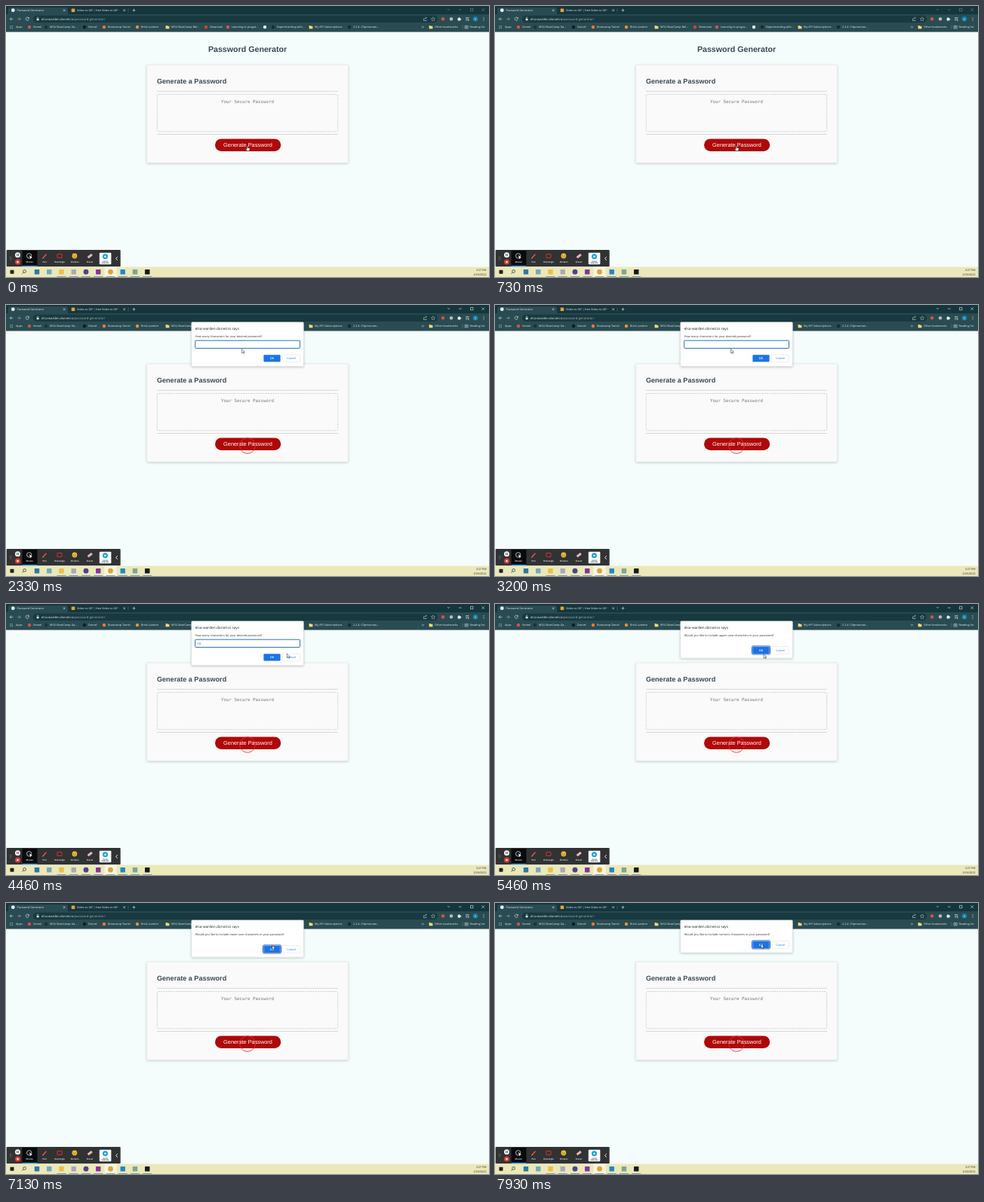
An HTML page for the animation above (8 s loop, 640x360 px).

```html
<!DOCTYPE html>
<html lang="en">
<head>
<meta charset="utf-8">
<title>Password Generator</title>
<style>
html, body { margin: 0; width: 100%; height: 100%; overflow: hidden; background: #f4fcfc; }
svg { display: block; width: 640px; height: 360px; }
text { font-family: "Open Sans", "Noto Sans", sans-serif; text-rendering: geometricPrecision; white-space: pre; }
.arial { font-family: "Liberation Sans", Arial, sans-serif; }
.mono { font-family: "DejaVu Sans Mono", monospace; }
.b { font-weight: bold; }
.semi { font-weight: 600; }
</style>
</head>
<body>
<svg id="stage" viewBox="0 0 640 360">
  <defs>
    <filter id="shade" x="-10%" y="-20%" width="120%" height="150%">
      <feDropShadow dx="0" dy=".8" stdDeviation="1.5" flood-opacity=".25"/>
    </filter>
  </defs>
</svg>
<script>
const stage = document.getElementById('stage');
const rect = (x, y, w, h, fill, r = 0, more = '') =>
  `<rect x="${x}" y="${y}" width="${w}" height="${h}" fill="${fill}" rx="${r}" ${more}/>`;
const dot = (x, y, r, fill, more = '') => `<circle cx="${x}" cy="${y}" r="${r}" fill="${fill}" ${more}/>`;
const line = (d, color, w = .6, more = '') => `<path d="${d}" fill="none" stroke="${color}" stroke-width="${w}" ${more}/>`;
const text = (x, y, size, fill, s, anchor = 'start', cls = '') =>
  `<text x="${x}" y="${y}" font-size="${size}" fill="${fill}" text-anchor="${anchor}" class="${cls}">${s}</text>`;
const folder = (x, y) => `<path d="M${x - 2.4} ${y - 2}h2l.7.8h2.1v3.4h-4.8z" fill="#f8d775"/>`;
const square = (x, y, s, fill) => rect(x - s / 2, y - s / 2, s, s, fill, .4);

const STRIP = '#15363d', BAR = '#294b52', FIELD = '#18393f', PALE = '#e3ecee', SOFT = '#9fb2b6';
const INK = '#3b4954', BLUE = '#1a73e8';

function browser() {
  let s = rect(0, 0, 640, 12, STRIP) + rect(0, 11, 640, 23.5, BAR);
  s += `<path d="M1 11.5q2 0 2-2v-5q0-2.500 2.500-2.500h74q2.500 0 2.500 2.500v5q0 2 2 2z" fill="${BAR}"/>`;
  s += dot(9.3, 5.7, 2.4, '#e8eef0') + text(14.5, 7.1, 3.75, PALE, 'Password Generator');
  s += line('M75.800 4.300l2.800 2.800m0-2.800l-2.800 2.800', PALE);
  s += square(89, 5.7, 4.6, '#e0a33a') + text(94, 7.1, 3.75, PALE, 'Video to GIF | free Video to GIF ·');
  s += line('M155.300 4.300l2.800 2.800m0-2.800l-2.800 2.800', PALE);
  s += line('M162 3.500v5', SOFT, .3) + line('M167.500 5.700h4m-2-2v4', PALE);
  s += `<g id="controls">${line('M585 4l1.500 1.500 1.500-1.500M600 5h3.600M615.500 3.300h3.400v3.400h-3.400zM630.500 3.300l3.500 3.500m0-3.500l-3.500 3.500', PALE)}</g>`;

  s += line('M9.500 17.300h-4.300m2-2l-2 2 2 2', PALE) + line('M15 17.300h4.300m-2-2l2 2-2 2', SOFT);
  s += line('M30 15.900a2.100 2.100 0 1 0 .3 1.800M30.400 14.900v1.700h-1.700', PALE);
  s += rect(36, 12.7, 536, 9.2, FIELD, 4.6);
  s += rect(40.700, 16.700, 2.8, 2.5, PALE, .3) + line('M41.200 16.700v-1a.9.9 0 0 1 1.800 0v1', PALE, .5);
  s += `<text x="47" y="18.800" font-size="4.2" fill="${PALE}">elsa-warden.dorvel.io<tspan fill="${SOFT}">/password-generator/</tspan></text>`;
  s += line('M553.500 16.500v3h3.500v-1.200M554.500 17.600q.3-2 2.700-2m-1-1l1 1-1 1', PALE, .5);
  s += line('M566 14.700l.8 1.700 1.800.2-1.300 1.300.3 1.800-1.600-.9-1.600.9.3-1.800-1.300-1.300 1.800-.2z', PALE, .4);
  s += dot(579, 17.300, 2.200, '#df4d40') + dot(590, 17.300, 2.200, '#b4bdbf');
  s += rect(598.600, 16, 3.700, 3.400, PALE, .3) + dot(600.300, 15.700, .8, PALE) + dot(602.600, 17.500, .8, PALE);
  s += line('M609 15.500h4.500m-4.500 1.700h4.500m-4.500 1.700h2.300', PALE) + dot(612.700, 19, .8, PALE);
  s += dot(622, 17.300, 3.300, '#1685ad') + text(622, 18.700, 3.700, '#fff', 'E', 'middle');
  s += [15.500, 17.300, 19.100].map(y => dot(633, y, .5, PALE)).join('');

  for (let i = 0; i < 9; i++) s += square(5.500 + i % 3 * 1.6, 26.400 + (i / 3 | 0) * 1.6, 1, i % 2 ? '#e9b44a' : '#73b9c3');
  // icon x, icon colour (none for a folder), label
  const marks = [
    [31, '#d95045', 'Vomel'], [53, '#272f31', 'MSU BootCamp Ga...'], [104, '#121a1c', 'Dorvel'],
    [130, '#e77837', 'Bootcamp Tarnel'], [174, '#df9341', 'Brick Lantern'], [214, '', 'MSU BootCamp Bel...'],
    [265, '#e53a32', 'Viewnook'], [294, '#e5504a', 'Learning to progra...'], [343, '#f2f4f4', ''],
    [354, '#192a2e', 'Experimenting with...'], [404, '', 'My API Subscriptions'],
    [455, '#192a2e', '2.2.4- Clipmorrow...'], [563, '', 'Other bookmarks']
  ];
  s += text(13, 29.400, 3.75, PALE, 'Apps');
  for (const [x, color, label] of marks)
    s += (color ? dot(x, 28, 2.2, color) : folder(x, 28)) + text(x + 5, 29.400, 3.75, PALE, label);
  s += line('M551 26.800l1.200 1.200-1.200 1.200m1.600-2.400l1.200 1.200-1.200 1.200', PALE, .5);
  s += line('M605 25.500v5', SOFT, .3) + line('M608 26.300h4.200v3.600h-4.200zm1 1.200h2.200m-2.200 1.200h2.200', PALE, .5);
  return s + text(614.500, 29.400, 3.75, PALE, 'Reading list');
}

function page() {
  const rule = y => line(`M200 ${y}h240`, '#c8cbce', .7);
  return rect(0, 34, 640, 313, '#f4fcfc')
    + text(320, 61.1, 10.67, INK, 'Password Generator', 'middle', 'arial b')
    + rect(186.700, 78.200, 266.600, 130, '#fafafa', 1, 'stroke="#dfe3e4" stroke-width=".4" filter="url(#shade)"')
    + text(200, 103, 9.07, INK, 'Generate a Password', 'start', 'arial b')
    + rule(113.300) + rule(170.500)
    + rect(200.300, 117.500, 239.400, 49.300, 'none', 1.500, 'stroke="#bcc0c2" stroke-width=".75" stroke-dasharray="2 1.3"')
    + text(320, 129, 5.82, '#777', 'Your Secure Password', 'middle', 'mono')
    + rect(277, 176.400, 87.200, 16.600, '#af0808', 8.300)
    + text(320.500, 187.200, 7.34, '#fff', 'Generate Password', 'middle', 'arial');
}

function recorder() {
  const label = (x, s) => text(x, 341.100, 2.9, '#eee', s, 'middle', 'semi');
  let s = rect(.7, 324, 151, 22.300, '#303234', 1) + rect(21.500, 325, 20, 21, '#090a0b') + rect(21.500, 344.800, 20, 1.4, '#2793df');
  for (let i = 0; i < 6; i++) s += dot(5.300 + i % 2 * 1.7, 333.500 + (i / 2 | 0) * 1.8, .45, '#aaa');
  s += dot(15.500, 330.700, 3.500, '#f5f5f5') + line('M14.700 329.200v3m1.700-3v3', '#333', .8);
  s += dot(15.500, 340.100, 3.500, '#e33b32') + square(15.500, 340.100, 2.2, '#fff');
  s += dot(30.700, 331.900, 3.200, 'none', 'stroke="#ddd" stroke-width=".8"') + `<path d="M31 331l3.800 3.600-1.700.2-.8 1.600z" fill="#fff"/>`;
  s += line('M49 334.700l4.500-5', '#ef493f', 1.700) + line('M48.400 335.500l1-1', '#fff', .8);
  s += rect(68, 329.500, 6, 5, 'none', .3, 'stroke="#dc3028" stroke-width="1"');
  s += dot(90.900, 332, 3.400, '#f2bd35') + dot(89.700, 331.200, .45, '#543') + dot(92.100, 331.200, .45, '#543') + line('M89.200 332.800q1.700 1.900 3.400 0', '#543', .5);
  s += rect(107.700, 330.700, 6.800, 3.100, '#eab3b3', .6, 'transform="rotate(-38 111 332)"');
  s += label(31.200, 'Mouse') + label(51.200, 'Pen') + label(71.200, 'Rectangle') + label(91.200, 'Stickers') + label(111.200, 'Eraser');
  s += rect(123.800, 327.700, 15.600, 15.500, '#fbfdfe', 1) + dot(131.500, 332.800, 3.500, '#22a0d3') + square(131.500, 332.800, 2.3, '#fff');
  s += text(131.500, 339.500, 2.1, '#345', 'SHOW', 'middle', 'b') + text(131.500, 342, 2.1, '#345', 'WEBCAM', 'middle', 'b');
  return s + line('M147.700 333.200l-2 2.300 2 2.300', '#fff', .9);
}

function taskbar() {
  let s = rect(0, 346.600, 640, 13.400, '#ebe8b9') + rect(130.500, 346.600, 16, 13.400, '#f8f6df');
  s += square(8, 353.200, 5, '#222') + dot(24.600, 352.400, 1.900, 'none', 'stroke="#222" stroke-width=".7"') + line('M23.200 353.800l-1.700 1.800', '#222', .7);
  const apps = ['#2d78a5', '#75a9bd', '#edbd48', '#a8a9ba', '#4b438d', '#80379a', '#dca43d', '#2486c8', '#7ca795', '#171a1c'];
  apps.forEach((color, i) => {
    const x = 41 + i * 16.25;
    s += i === 4 || i === 6 ? dot(x, 353.200, 3.400, color) : square(x, 353.200, 6.4, color);
    if (i > 1) s += rect(x - 6, 359.300, 12, .7, '#5b7d91');
  });
  return s + text(636.500, 351.900, 3.6, '#222', '3:27 PM', 'end') + text(636.500, 358.100, 3.6, '#222', '2/26/2022', 'end');
}

const questions = [
  [1530, 'How many characters for your desired password?', 81.500],
  [4930, 'Would you like to include upper case characters in your password?', 72],
  [5930, 'Would you like to include lower case characters in your password?', 72],
  [7660, 'Would you like to include numeric characters in your password?', 66]
];

function dialog(t) {
  const i = questions.findLastIndex(q => t >= q[0]);
  if (i < 0) return '';
  const [, question, bottom] = questions[i], y = bottom - 10.600;
  let s = rect(245.700, 22.700, 148.700, bottom - 22.700, '#fff', 1.300, 'stroke="#c6caca" stroke-width=".4" filter="url(#shade)"');
  s += text(250.700, 33.300, 4.75, '#202124', 'elsa-warden.dorvel.io says') + text(250.700, 42.500, 3.85, '#333', question);
  if (!i) {
    const typed = t < 3600 ? '' : t < 3730 ? '1' : '10';
    s += rect(250.700, 47.200, 138.800, 10.300, '#fff', .8, 'stroke="#2877b9" stroke-width="1"') + text(253.500, 53.700, 3.85, '#333', typed);
  } else s += rect(340.500, y - 5.500, 24, 11, '#fff', 1.500, `stroke="#174ea6" stroke-width=".9"`);
  s += rect(341.400, y - 4.700, 22.200, 9.400, BLUE, 1) + text(352.500, y + 1.400, 3.8, '#fff', 'OK', 'middle', 'semi');
  s += rect(366.300, y - 4.900, 23.200, 9.800, '#fff', 1.200, 'stroke="#dadce0" stroke-width=".5"');
  return s + text(378, y + 1.400, 3.8, BLUE, 'Cancel', 'middle');
}

// time, x, y of the pointer tip
const path = [
  [0, 319.800, 186], [1600, 319.800, 186], [2200, 312.500, 58.500], [4000, 312.500, 58.500],
  [4400, 372.500, 66], [4530, 372.500, 66], [4800, 356, 66.500], [5500, 356, 66.500],
  [5800, 353.700, 59.800], [6700, 353.700, 59.800], [7300, 352.600, 54.700], [8000, 352.600, 54.700]
];

function pointer(t) {
  const i = Math.max(1, path.findIndex(p => p[0] > t)), [a, b] = [path[i - 1], path[i]];
  const k = (t - a[0]) / (b[0] - a[0]), e = k * k * (3 - 2 * k);
  const x = a[1] + (b[1] - a[1]) * e, y = a[2] + (b[2] - a[2]) * e;
  const shape = t < 1600
    ? 'M-.6 0q.6-.6 1.200 0v2.200l2.100.5q.7.300.6 1.100l-.6 2.700h-3.200l-1.700-2.500q.2-.9 1.600.2z'
    : 'M0 0v5.400l1.300-1.200.9 2 .9-.4-.9-2h1.700z';
  return `<path transform="translate(${x} ${y})" d="${shape}" fill="#fff" stroke="#111" stroke-width=".45"/>`;
}

function ring(t) {
  if (t < 1330) return '';
  const r = 4 + 6.300 * Math.min(1, (t - 1330) / 130);
  return dot(320, 187, r, 'none', 'stroke="#e8323c" stroke-width="1" opacity=".85"');
}

stage.insertAdjacentHTML('beforeend', page() + browser() + recorder() + taskbar() + '<g id="live"></g>');
const live = document.getElementById('live'), controls = document.getElementById('controls');
const start = performance.now(), STEP = 200 / 3;

function draw(now) {
  const t = Math.floor(Math.max(0, now - start) % 8000 / STEP) * STEP;
  controls.setAttribute('opacity', t < 1330 ? .45 : 1);
  live.innerHTML = ring(t) + dialog(t) + pointer(t);
  requestAnimationFrame(draw);
}
draw(start);
</script>
</body>
</html>
```
